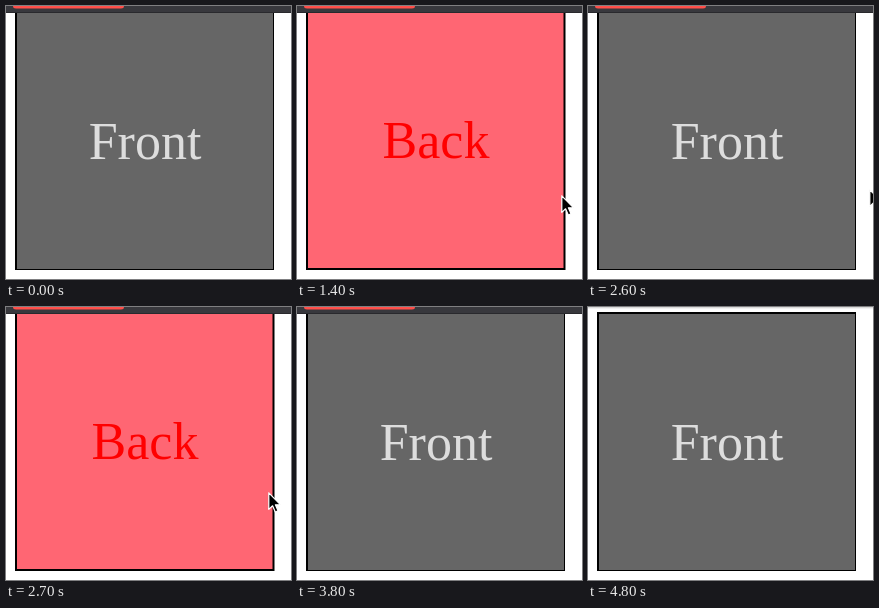
Recreate the animation shown at these times as an HTML page. Size 285 by 273 pixels, loop 4.9 s.

```html
<!DOCTYPE html>
<html lang="en">
<head>
<meta charset="utf-8">
<title>Flip card on hover</title>
<style>
  html, body { margin: 0; width: 100%; height: 100%; overflow: hidden; background: #fff; }
  svg { display: block; width: 285px; height: 273px; }
  text { font: 52px "Liberation Serif", "Times New Roman", serif; text-anchor: middle; }
  .back, .cursor, .bar, .button { animation: 4900ms step-end infinite; }
  .back { animation-name: flip; }
  .cursor { animation-name: pointer; }
  .bar { animation-name: close; }
  .button { animation-name: hover; }

  /* 100 ms = 2.0408% */
  @keyframes flip {
    0%, 14.2857%, 30.6122%, 57.1429%, 77.551% { visibility: hidden; }
    10.2041%, 26.5306%, 55.102%, 75.5102% { visibility: visible; }
    100% { visibility: hidden; }
  }
  @keyframes pointer {
    0% { transform: translate(300px, 196px); }
    10.2041% { transform: translate(242px, 195px); }
    12.2449% { transform: translate(257px, 194px); }
    14.2857% { transform: translate(300px, 194px); }
    26.5306% { transform: translate(252px, 191px); }
    28.5714% { transform: translate(264px, 189px); }
    30.6122% { transform: translate(300px, 189px); }
    53.0612% { transform: translate(281px, 183px); }
    55.102% { transform: translate(262px, 185px); }
    57.1429% { transform: translate(300px, 185px); }
    75.5102% { transform: translate(267px, 182px); }
    77.551%, 100% { transform: translate(300px, 182px); }
  }
  @keyframes hover {
    0% { fill: #ff4f4a; }
    91.8367% { fill: #f4483f; }
    93.8776%, 100% { fill: #e84239; }
  }
  @keyframes close {
    0% { visibility: visible; }
    97.9592%, 100% { visibility: hidden; }
  }
</style>
</head>
<body>
<svg viewBox="0 0 285 273">
  <path fill="#d9d9d9" d="M0 0h285v1H0z"/>
  <path fill="#f1f1f1" d="M0 1h285v1H0z"/>

  <g class="front">
    <path d="M9 5h259v259H9z"/>
    <path fill="#666" d="M11 7h256v256H11z"/>
    <text x="139" y="152.5" fill="#ddd">Front</text>
  </g>

  <g class="back">
    <path d="M9.5 5H268.5V264H9.5z"/>
    <path fill="#ff6673" d="M11 7H266.5V262H11z"/>
    <text x="139" y="152" fill="#f00">Back</text>
  </g>

  <g class="bar">
    <path fill="#38383d" d="M0 0h285v7H0z"/>
    <path fill="#29292d" d="M0 6h285v1H0z"/>
    <path class="button" d="M7 0h111q0 2.5-3 2.5H10Q7 2.5 7 0z"/>
  </g>

  <path class="cursor" stroke="#fff" stroke-width="1.2" stroke-linejoin="round"
        d="M.8.8V17.4L4.6 13.8 7.3 20 10 18.8 7.4 12.8H12.6z"/>
</svg>
</body>
</html>
```
